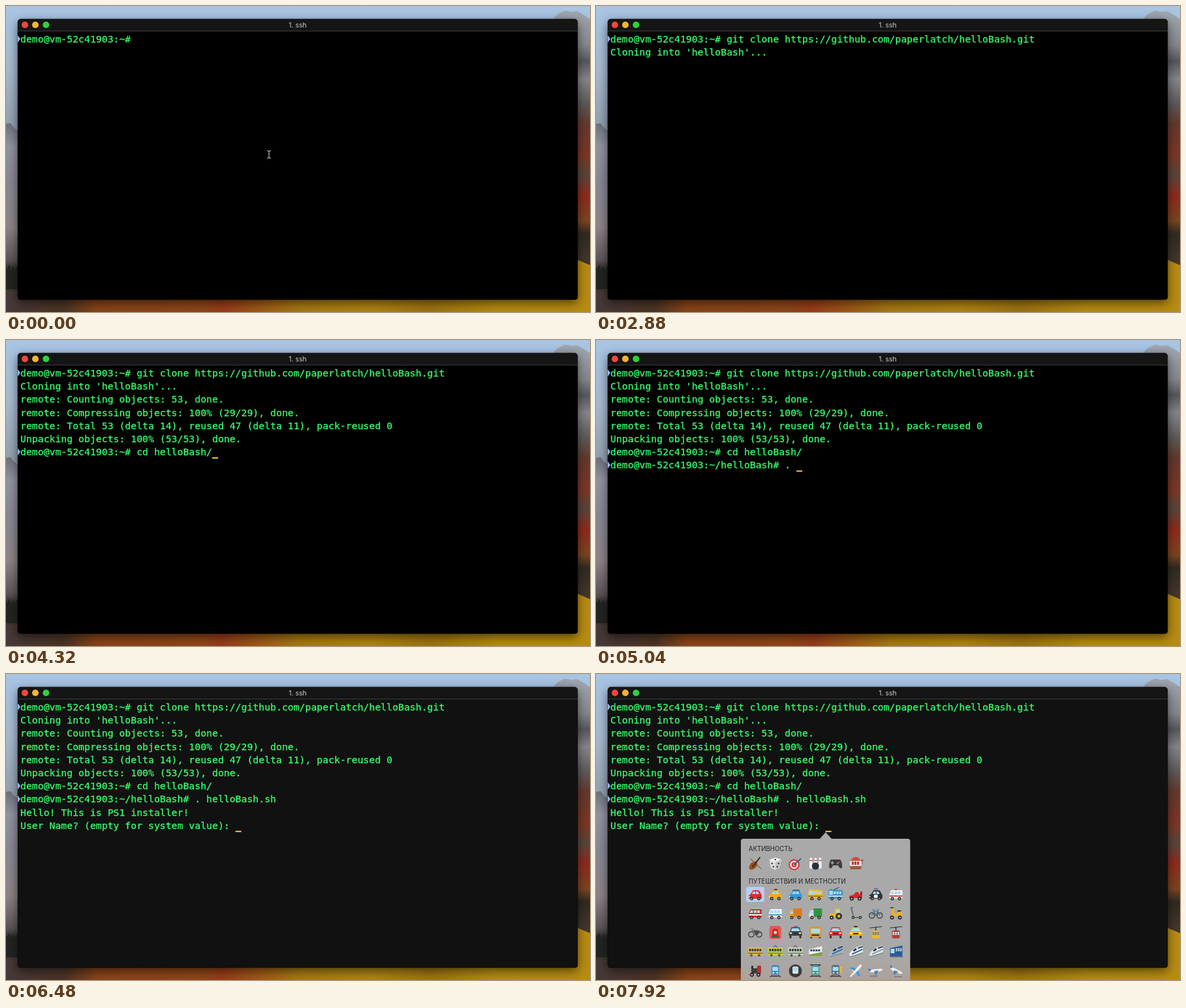
Animation, 895 px wide and 470 px high, one loop 8000 ms. Source, as an HTML page:

```html
<!DOCTYPE html>
<html lang="en">
<head>
<meta charset="utf-8">
<title>Terminal</title>
<style>
html, body { margin: 0; width: 100%; height: 100%; overflow: hidden; background: #a6c2e2 }
svg { display: block; width: 895px; height: 470px }
.term { font: 14.8px "DejaVu Sans Mono", monospace; fill: #36ff6a; stroke: #36ff6a; stroke-width: .3px; white-space: pre }
.label { font: 9.65px Inter, sans-serif; fill: #222 }
.title { font: 10.5px Inter, sans-serif; fill: #ccc; text-anchor: middle }
.window { filter: drop-shadow(0 5px 8px #0008) }
</style>
</head>
<body>
<svg viewBox="0 0 895 470">
  <defs id="defs"></defs>
  <path fill="url(#sky)" d="M0 0H895V470H0z"/>
  <path fill="url(#left)" d="M0 181L7 180 12 187 30 200V470H0z"/>
  <path fill="#232522" d="M0 435V400l2 5 3-8 3 9 3-7 3 8 3-9 3 12v25z"/>
  <path fill="url(#right)" d="M836 22L846 12 857 7 866 9 876 8 886 14 895 20V470H860V22z"/>
  <path fill="url(#ground)" d="M0 440L100 446H860L876 390 895 398V470H0z"/>
  <g class="window">
    <path id="pane" stroke="#0008" d="M18 25a5 5 0 0 1 5-5H871a5 5 0 0 1 5 5V447a4 4 0 0 1-4 4H22a4 4 0 0 1-4-4z"/>
  </g>
  <path fill="#151515" d="M18 38V25a5 5 0 0 1 5-5H871a5 5 0 0 1 5 5V38z"/>
  <path stroke="#3b3b3b" d="M18 38.5H876"/>
  <circle cx="29" cy="29" r="5" fill="#f5453f"/>
  <circle cx="45" cy="29" r="5" fill="#f8b62d"/>
  <circle cx="61.3" cy="29" r="5" fill="#2bd33f"/>
  <text class="title" x="447" y="33">1. ssh</text>
  <g id="screen"></g>
  <path id="pointer" fill="none" stroke="#ddd" d="M400 222q3 0 3 2v8q0 2-3 2M406 222q-3 0-3 2M406 234q-3 0-3-2"/>
  <g id="picker"></g>
</svg>
<script>
const el = id => document.getElementById(id);

// Soft gradients: pixel position followed by colour.
const gradient = (id, axis, length, stops) =>
  `<linearGradient id="${id}" gradientUnits="userSpaceOnUse" x1="0" y1="0" x2="${axis === 'x' ? length : 0}" y2="${axis === 'y' ? length : 0}">` +
  stops.split(' ').map(s => s.split('#')).map(([at, col]) => `<stop offset="${at / length}" stop-color="#${col}"/>`).join('') +
  '</linearGradient>';
el('defs').innerHTML =
  gradient('sky', 'y', 470, '0#a8c5e4 100#a6bad0 190#929fad') +
  gradient('left', 'y', 470, '180#6b727e 215#9294a0 270#888896 340#8d8488 390#5c5558 405#2c2b28 430#322c28 445#54423a 470#3d3029') +
  gradient('right', 'y', 470, '8#a0a7b2 60#85878c 85#56575b 112#85858a 150#5d5a58 180#62392e 230#7c3626 260#57463a 290#8e2a1e 330#7a4420 350#2f2a22 390#43362c') +
  gradient('ground', 'x', 895, '0#45393a 90#4d3424 140#8a4519 300#8f4718 330#983c1a 390#a05a18 450#a87a14 560#b08414 650#9c7412 750#b58c12 895#b88c12') +
  gradient('sheet', 'y', 470, '430#a9a9a9 470#aca29a');

// Icon helpers, drawn around the centre of a cell.
const rect = (x, y, w, h, col, r = 1) => `<rect x="${x}" y="${y}" width="${w}" height="${h}" rx="${r}" fill="${col}"/>`;
const disc = (x, y, r, col) => `<circle cx="${x}" cy="${y}" r="${r}" fill="${col}"/>`;
const fill = (d, col) => `<path d="${d}" fill="${col}"/>`;
const line = (d, col, w = 1.5) => `<path d="${d}" fill="none" stroke="${col}" stroke-width="${w}" stroke-linecap="round"/>`;
const wheel = (x, r = 2.5) => disc(x, 6, r, '#242424') + disc(x, 6, r * .45, '#bbb');
const wheels = wheel(-5.5) + wheel(5.5);
const glass = '#a5dcf2', dark = '#333', grey = '#777', white = '#f1f1f1';
const panes = (x, n, y, w = 3, h = 4, col = glass) =>
  Array.from({length: n}, (_, i) => rect(x + i * (w + 1), y, w, h, col, .5)).join('');

const car = (col, extra = '') => fill('M-10 6V1l3-2 3-5q1-1 2-1H4q2 0 3 2l2 4 1 1v6z', col) +
  fill('M-5-1l2-4h3v4zM1-5h3l2 4H1z', glass) + rect(-10, 2, 2, 2, '#ffe9a0') + wheels + extra;
const van = (col, stripe, extra = '') => fill('M-10 6V-1l3-6H9q1 0 1 1V6z', col) + fill('M-8.5-1l2-4h3v4z', glass) +
  rect(-10, 1, 20, 2, stripe, 0) + panes(-2, 2, -5, 4) + wheels + extra;
const bus = (col, stripe) => fill('M-11 6V-5q0-3 3-3.5L10-7q1 0 1 2V5l-3 1z', col) + rect(-10, -6, 6, 6, glass) +
  panes(-3, 3, -5, 3.3) + rect(-11, 1.5, 22, 1.6, stripe, 0) + wheels;
const truck = (cab, box) => rect(-3, -8, 13, 13, box) + fill('M-10 6V0l2-5h5V6z', cab) + fill('M-8.5 0l1.5-3.5h3V0z', glass) + wheels;
const front = (col, top = '') => fill('M-10 5V0l2-2 2-6H6l2 6 2 2v5z', col) + fill('M-7-2l2-4.5H5L7-2z', glass) +
  rect(-9, 0, 4, 2, '#fff3b0') + rect(5, 0, 4, 2, '#fff3b0') + rect(-4, 1, 8, 2, dark) +
  rect(-9, 5, 3, 4, dark) + rect(6, 5, 3, 4, dark) + top;
const cabin = (col, top) => line('M-9-7L9-9', dark, 1.2) + line('M0-8v5', dark) + rect(-6, -3, 12, 12, col, 2) +
  panes(-5, 3, -1, 2.7, 5, top);
const tram = (col, band, roof = '') => rect(-11, -6, 22, 12, col) + panes(-9.5, 5, -4, 3, 4, '#345') + rect(-11, 2, 22, 1.5, band, 0) +
  wheel(-6, 1.8) + wheel(6, 1.8) + roof;
const pole = line('M-3-6L0-9 3-6', dark, 1);
const bullet = (col, band) => fill('M-10 5Q-8-1 1-6L9-9q2 0 2 2V1L-5 7q-4 1-5-2z', col) + fill('M-5-1l5-4 2 2-4 3z', '#234') +
  line('M-5 4L10-3', band, 2) + line('M4-5l6-2', '#345', 2) + line('M-8 8L10 3', grey, 1);
const trainFace = (col, under) => rect(-6, -9, 12, 15, col, 3) + rect(-4.5, -6, 9, 6, glass) + disc(-3, 3, 1.2, white) +
  disc(3, 3, 1.2, white) + under;
const rails = line('M-5 7l-3 2M5 7l3 2M-6 8H6', dark, 1.3);
const spokes = x => `<circle cx="${x}" cy="3" r="4.2" fill="none" stroke="#333" stroke-width="1.2"/>`;
const beacon = rect(-3, -10, 3, 2, '#e33') + rect(0, -10, 3, 2, '#36d');
const plane = fill('M-9 8L-3 1-10-4-8-6 1-4 6-9q4-2 3 2L4-1 7 8 5 10 0 3-6 8-7 10z', white) +
  fill('M-10-4L-8-6 1-4-2 0zM4-1L7 8 5 10 0 3z', '#4b92cc');
const liner = (turn, runway) => `<g transform="rotate(${turn})">` +
  fill('M-10-1q-1-3 2-3L9-1q3 2 0 3H-3z', white) + fill('M-10-1l-1-5h2l3 3zM-3 0L4 0 0 6H-2z', '#4b82b8') + '</g>' +
  line(runway, grey);

const rows = [
  [291, [
    fill('M2-4Q5 3 0 7T-8 9-8 2-2-2z', '#9b4f1f') + line('M-4 5L7-9', '#3a2415', 2) + line('M-7-7L9 8', '#6b3a1c', 1),
    fill('M-9-6L0-9 9-6 7 6 0 10-7 6z', white) + fill('M-9-6L0-2V10L-7 6z', '#dedede') + fill('M0-2L9-6 7 6 0 10z', '#c2c2c2') +
      [[0, -6], [-5, 0], [-3, 5], [3, 5], [5, 0]].map(([x, y]) => disc(x, y, 1.2, dark)).join(''),
    disc(-2, 2, 8.5, '#d9363b') + disc(-2, 2, 6.2, white) + disc(-2, 2, 4, '#d9363b') + disc(-2, 2, 1.7, white) + line('M-2 2L8-7', '#27639b', 2),
    [-7, 0, 7].map(x => rect(x - 2.3, -5, 4.6, 13, white, 2) + disc(x, -7, 2, white) + rect(x - 2, -5, 4, 1.2, '#d33', 0)).join('') + disc(0, 4, 5.5, '#29323a'),
    fill('M-7-6H7q3 3 3 12-3 4-6-3H-4q-3 7-6 3 0-9 3-12z', '#3b3b3b') + line('M-7-1h4M-5-3v4', '#aaa') + disc(5, -2, 1.3, '#d44') + disc(3, 0, 1.3, '#4b8'),
    fill('M-8-3Q-6-10 0-10T8-3z', '#c9513f') + rect(-9, -4, 18, 8, '#e9e3d8', 2) + panes(-6, 3, -3, 3, 5, '#c33') +
      fill('M-9 4H9l-1 5H-8z', '#9d5c45') + line('M10-5v6', grey) + disc(10, -5, 1.5, '#d33')
  ]],
  [339, [
    car('#dc2f2c'), car('#f1a91d', rect(-2, -9, 5, 2, '#444')), car('#329bd7', line('M-4-7H6', dark, 1)),
    bus('#f2b735', '#946c1c'), bus('#3c91c7', '#eee') + line('M-2-8L5-11', dark, 1),
    fill('M-10 5V2l7-2 3-4h4l1 3h5v6z', '#d9262a') + rect(7, -5, 3, 5, '#b51d22') + wheel(-6, 3) + wheel(6, 3),
    car('#2f3133', rect(-3, 0, 6, 5, white) + beacon), van(white, '#e04a3c', rect(-2, -9, 4, 2, '#e33'))
  ]],
  [368, [
    van('#d7322d', white, line('M-4-8H10', '#bbb')), van(white, '#5598c4'), truck('#e7a325', '#d97a22'), truck('#ddd', '#2f9442'),
    fill('M-10 5V0h8l1-8h8v9l2 4z', '#edb72d') + rect(1, -6, 5, 5, glass) + wheel(-6, 3) + disc(5, 4, 5, dark) + disc(5, 4, 2.2, '#edb72d'),
    line('M-4-9h-3l4 15H6', '#55636b') + wheel(-4, 2.3) + wheel(7, 2.3),
    spokes(-6) + spokes(6) + line('M-6 3l3-7h6l3 7M-3-4l3 7 3-7M-5-6h3M2-6h3', '#4b6e8a', 1.2),
    fill('M-7-8l3-1 2 9h4l2-4h5l1 8H-7z', '#e8b326') + line('M-8-9h4', dark) + rect(2, -5, 6, 2, dark) + wheel(-6, 3) + wheel(6, 3)
  ]],
  [397, [
    spokes(-6) + spokes(6) + fill('M-5-4L5-3 8-1 3 4H-2z', '#4d4d4d') + line('M-7-6h3l3 9', '#888'),
    rect(-9, -10, 18, 20, '#e8574d', 4) + fill('M-5 5L-4-4q4-4 8 0L5 5z', '#c9231f') + rect(-6, 5, 12, 3, '#555') + disc(0, 0, 2.5, '#ffd0c0'),
    front('#3c4247', beacon), rect(-9, -9, 18, 16, '#d79a32', 2) + rect(-7, -6, 14, 7, glass) + rect(-6, 3, 12, 2, dark) + rect(-8, 7, 3, 2, dark) + rect(5, 7, 3, 2, dark),
    front('#d8302f'), front('#ecb127', rect(-3, -10, 6, 2, dark)), cabin('#efb82e', '#6a8a9a'), cabin('#b33c35', glass)
  ]],
  [426, [
    tram('#e6bd4c', '#75622c'), tram('#d8d23f', '#498a3a', pole), tram('#d8d5bb', '#508055', pole),
    fill('M-10 3L10-4V7H-10z', '#7aa33e') + fill('M-10-3L10-8v9l-20 4z', white) + panes(-8, 4, -3, 3, 3, '#345'),
    bullet('#a9bac8', '#3a6faa'), bullet(white, '#356eb0'), bullet('#e2e7ea', '#8aa0b4'),
    fill('M-9-5L10-9V8H-9z', '#2b5b98') + rect(-8, -4, 6, 7, glass) + panes(0, 3, -5, 2.3, 5, '#bcd') + line('M-9 8.5H10', grey)
  ]],
  [456, [
    rect(-6, -4, 12, 8, '#3d3d3d') + rect(3, -8, 6, 12, '#b52e2c') + rect(-6, -8, 3, 5, dark) + wheel(-5, 3) + wheel(5, 3) + fill('M-10 7l3-4v4z', '#c33'),
    trainFace('#4c86c0', rails), disc(0, 0, 10, '#3d3d3d') + `<g transform="scale(.75)">${trainFace('#d9dde0', rails)}</g>`,
    rect(-8, -10, 16, 2, dark) + trainFace('#4b9b91', rails), trainFace('#587082', rails) + rect(6, -7, 4, 10, '#e3b52d'),
    plane, liner(-14, 'M-9 8H2'), liner(18, 'M-2 9H9')
  ]]
];
const picker = fill('M222 474V257a4 4 0 0 1 4-4H343l9-10 9 10H477.5a4 4 0 0 1 4 4V474z', 'url(#sheet)') +
  '<text class="label" x="234" y="271.5">АКТИВНОСТЬ</text><text class="label" x="234" y="321.5">ПУТЕШЕСТВИЯ И МЕСТНОСТИ</text>' +
  rect(230, 327, 28, 23, '#b5cff5', 3) +
  rows.map(([y, icons]) => icons.map((icon, i) => `<g transform="translate(${244 + i * 30.8} ${y})">${icon}</g>`).join('')).join('');

// Terminal session: finished lines, then the line being typed.
const host = 'demo@vm-52c41903:~';
const home = host + '# ', repo = host + '/helloBash# ';
const log = [
  home + 'git clone https://github.com/paperlatch/helloBash.git',
  "Cloning into 'helloBash'...",
  'remote: Counting objects: 53, done.',
  'remote: Compressing objects: 100% (29/29), done.',
  'remote: Total 53 (delta 14), reused 47 (delta 11), pack-reused 0',
  'Unpacking objects: 100% (53/53), done.',
  home + 'cd helloBash/',
  repo + '. helloBash.sh',
  'Hello! This is PS1 installer!',
  'User Name? (empty for system value): '
];
const steps = [
  [0, home, false], [0, home, true], [0, home + 'git ', true], [0, log[0], true],
  [2, '', false], [6, home + 'c', true], [6, log[6], true], [7, repo + '. ', true],
  [7, log[7], true], [9, log[9], true], [9, log[9], true], [9, log[9], true]
];
const LOOP = 8000, HOLD = 720, COL = 8.91, ROW = 20.2;

function render(step) {
  const [done, typed, cursor] = steps[step];
  const lines = [...log.slice(0, done), typed];
  el('screen').innerHTML = lines.map((text, i) => {
    const y = 56 + i * ROW;
    return (text.startsWith(host) ? fill(`M18 ${y - 11}l4 5.5-4 5.5z`, '#8fb9f0') : '') +
      `<text class="term" x="22" y="${y}">${text}</text>`;
  }).join('') + (cursor ? rect(22 + typed.length * COL, 59 + done * ROW, 9, 2, '#f3d03c', 0) : '');
  el('pane').setAttribute('fill', step < 9 ? '#000' : '#111');
  el('pointer').style.display = step ? 'none' : '';
  el('picker').innerHTML = step === 11 ? picker : '';
}

let shown = -1;
function tick() {
  const step = Math.floor(performance.now() % LOOP / HOLD);
  if (step !== shown) render(shown = step);
  requestAnimationFrame(tick);
}
tick();
</script>
</body>
</html>
```
